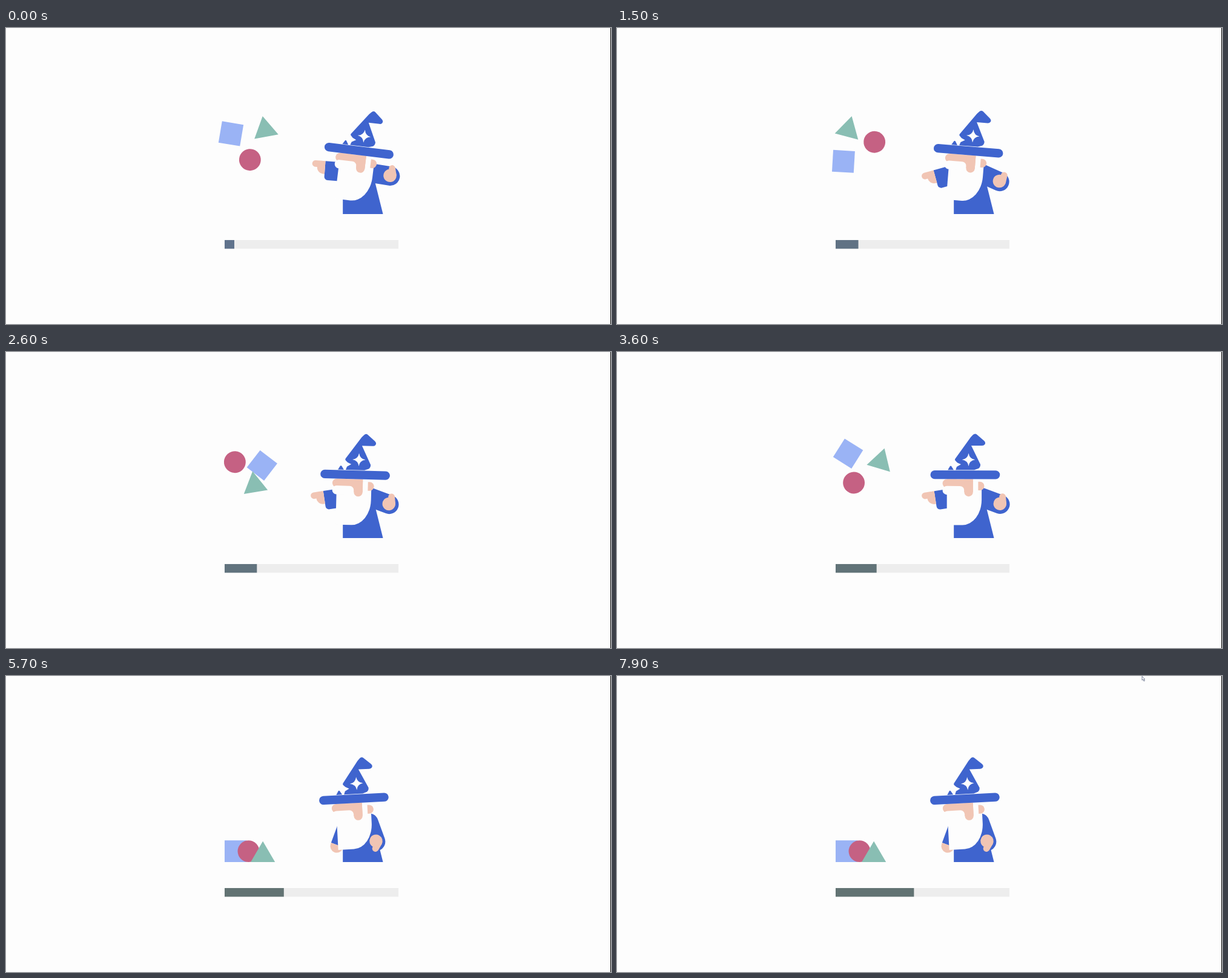
These frames come from a looping animation (999x490 px, 8000 ms). An HTML page:

```html
<!DOCTYPE html>
<html lang="en">
<head>
<meta charset="utf-8">
<title>Wizard loader</title>
<style>
  html, body { margin: 0; width: 100%; height: 100%; overflow: hidden; background: #fdfdfd; }
  svg { display: block; }
  .blue { fill: #3f64ce; }
  .skin { fill: #f1c5b4; }
  .white { fill: #fdfdfd; }
</style>
</head>
<body>
<svg width="999" height="490" viewBox="0 0 999 490">
  <g transform="translate(361 308) scale(.7175)">
    <rect id="square" y="-50" width="50" height="50" fill="#9ab3f5"/>
    <circle id="circle" cx="55" cy="-25" r="25" fill="#c56183"/>
    <path id="triangle" d="M60 0H116L88-48Z" fill="#89beb3"/>

    <path class="blue" d="M272 0V-100H339.5L364.5 0Z"/>

    <g id="rightArm">
      <rect class="blue" x="-16" y="-22" width="90" height="44" rx="22"/>
      <g id="rightHand" class="skin">
        <circle r="15"/>
        <rect id="thumb" y="-23" width="15" height="30" rx="7.5"/>
      </g>
    </g>

    <g id="leftArm">
      <path class="blue" d="M-60-26H10V18H-52a8 8 0 0 1-8-8Z"/>
      <path class="skin" d="M-60-26h-3a15 15 0 0 0 0 30h3Z"/>
      <rect id="finger" class="skin" x="-30" width="30" height="15" rx="7.5"/>
    </g>

    <g id="head">
      <path class="white" d="M-42-1H38V46.7A44 58.3 0 0 1-6 105H-42Z"/>
      <g class="skin">
        <rect x="-42" y="-1" width="60" height="30"/>
        <rect x="-52" y="-1" width="40" height="20" rx="10"/>
        <path d="M30 5h4a10 10 0 0 1 0 20h-4Z"/>
      </g>
      <path class="white" d="M-42 15H-12a10 10 0 0 1 10 10V35H-42a10 10 0 0 1 0-20Z"/>
      <path class="skin" d="M-2-1H18V29a10 10 0 0 1-20 0Z"/>
      <g class="blue">
        <rect x="-80" y="-21" width="160" height="20" rx="10"/>
        <path d="M-23-44Q-24.500-46-23-48L12.700-97.700 18-103.300Q22.400-107.500 26.600-104L43.500-89.500Q48-85 45-81Q43-78.200 39-78.200H14L35-35Q35.500-29 30.800-25.500L21-22H-22L-19.400-29.400-9.600-35-18-39Z"/>
        <path d="M-40-22L-35.300-30Q-33.300-33-31.300-30L-26.300-22Z"/>
      </g>
      <path class="white" d="M7.800-61q2 13 15 15q-13 2-15 15q-2-13-15-15q13-2 15-15Z"/>
    </g>

    <rect y="60" width="400" height="20" fill="#ededed"/>
    <rect id="bar" y="60" height="20"/>
  </g>
  <path d="M998 0h1v490h-1Z"/>
  <path id="cursor" d="M867 .5V7l1.700-1.300 1.300 2.800 1.300-.6-1.300-2.700H871.500Z" fill="#fff" stroke="#5a6480" stroke-width=".8"/>
</svg>
<script>
const LOOP = 8000, START = 1.115, STEP = 100;
const $ = id => document.getElementById(id);
const place = (id, value) => $(id).setAttribute('transform', value);

// cubic-bezier(.42, 0, .58, 1)
function ease(x) {
  let lo = 0, hi = 1;
  for (let i = 0; i < 24; i++) {
    const s = (lo + hi) / 2, r = 1 - s;
    if (1.26 * s * r * r + 1.74 * s * s * r + s ** 3 < x) lo = s; else hi = s;
  }
  return lo * lo * (3 - 2 * lo);
}

// keys: percent, value, percent, value, ...
function tween(p, keys) {
  if (p <= keys[0]) return keys[1];
  for (let i = 2; i < keys.length; i += 2) {
    if (p < keys[i]) {
      const a = keys[i - 2], from = keys[i - 1];
      return from + (keys[i + 1] - from) * ease((p - a) / (keys[i] - a));
    }
  }
  return keys[keys.length - 1];
}

const TURNS = {
  rightArm: [10, 8, 15, 20, 20, 10, 25, 26, 30, 10, 35, 28, 40, 9, 45, 28, 50, 8, 58, 74, 62, 70],
  rightHand: [10, -20, 15, -5, 20, -60, 25, -5, 30, -60, 35, -5, 40, -60, 45, -5, 50, -60, 60, -40],
  leftArm: [10, 7, 15, -18, 20, 5, 25, -18, 30, 5, 35, -17, 40, 5, 45, -18, 50, 6, 58, -74, 62, -70],
  head: [10, 7, 50, 0, 56, -3]
};
const JOINTS = { rightArm: [330, -96], rightHand: [51, -1], leftArm: [290, -92], head: [298, -135] };

// pivot, lift, first and last angle, start of the fall
const SHAPES = {
  square: { pivot: [60, 0], lift: [-15, -155], from: 10, to: -350, fall: 57 },
  circle: { pivot: [55, -60], lift: [0, -100], from: -5, to: -360, fall: 58 },
  triangle: { pivot: [51, 7], lift: [10, -172], from: -10, to: -365, fall: 58 }
};

function draw(t) {
  const sec = START + t / 1000, p = sec * 10;

  for (const id in SHAPES) {
    const { pivot, lift, from, to, fall } = SHAPES[id];
    const up = tween(p, [fall, 1, 63, 0]);
    const angle = tween(p, [10, from, 55, to, fall, to, 63, -360]);
    place(id, `translate(${lift[0] * up} ${lift[1] * up}) rotate(${angle} ${pivot})`);
  }

  const lean = tween(p, [10, 10, 50, 0]);
  for (const id in JOINTS) {
    const [x, y] = JOINTS[id];
    place(id, `translate(${x + (id === 'head' ? lean : 0)} ${y}) rotate(${tween(p, TURNS[id])})`);
  }
  const tucked = tween(p, [50, 0, 60, 1]);
  place('thumb', `translate(0 ${16 * tucked})`);
  place('finger', `translate(-60 -26) scale(${1 - tucked} 1)`);

  const fade = Math.min(t / 4500, 1);
  $('bar').setAttribute('width', sec * 20);
  $('bar').setAttribute('fill', `rgb(${95 + 3 * fade},${114 + fade},${140 - 25 * fade})`);
  $('cursor').style.display = t >= 7900 ? '' : 'none';
}

function tick() {
  draw(Math.floor(performance.now() % LOOP / STEP) * STEP);
  requestAnimationFrame(tick);
}
tick();
</script>
</body>
</html>
```
